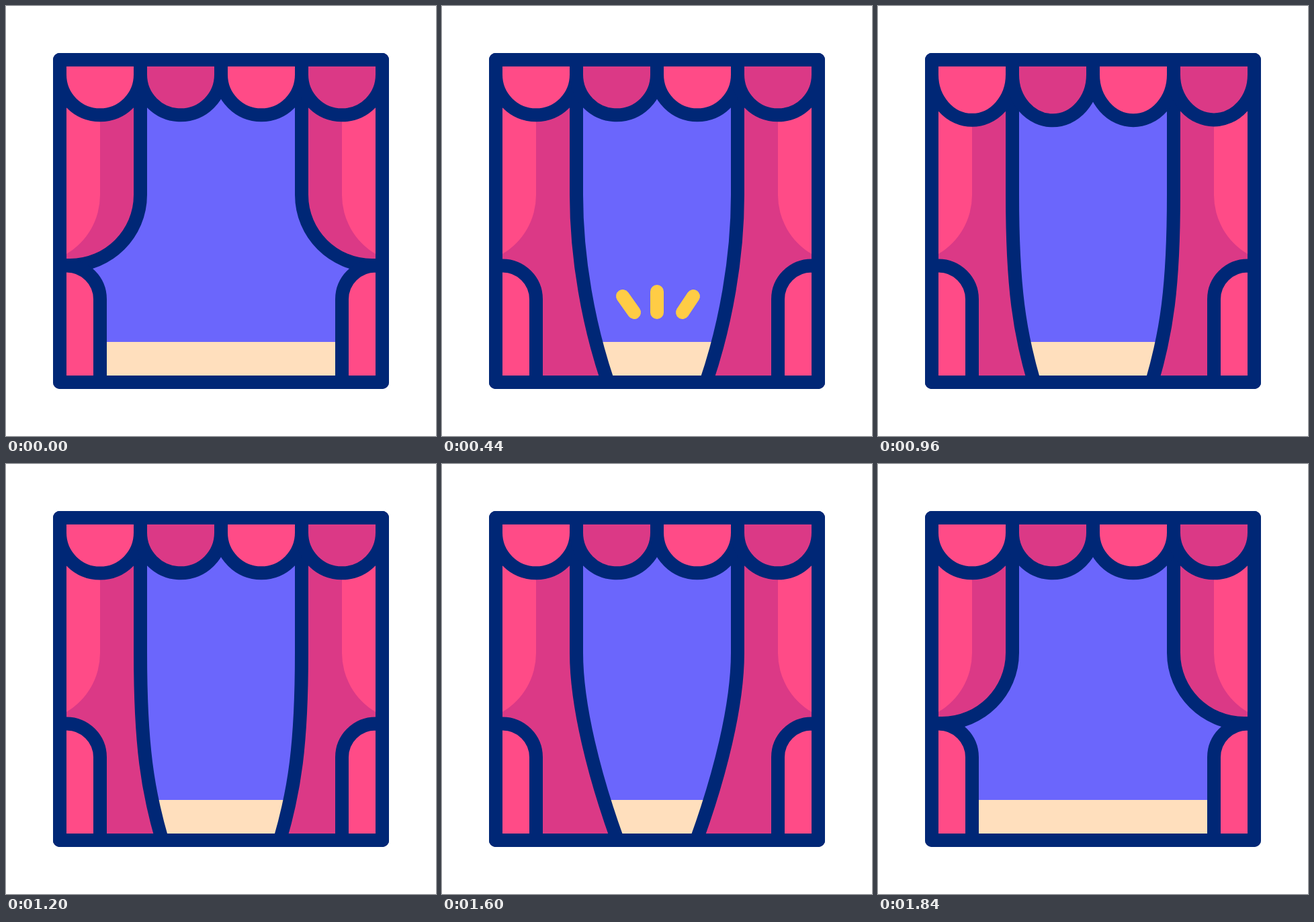
Write an HTML page that moves like this. It is 640 by 640 pixels and loops after 2 s.

```html
<!DOCTYPE html>
<html lang="en">
<head>
<meta charset="utf-8">
<title>Stage curtains</title>
<style>
  html, body { margin: 0; width: 100%; height: 100%; overflow: hidden; background: #fff; }
  svg { display: block; width: 100vw; height: 100vh; }
  .line { fill: none; stroke: #002776; stroke-width: 20; stroke-linejoin: round; }
  .pink { fill: #ff4b87; }
  .dark { fill: #db3986; }
  .ray { stroke: #ffcc45; stroke-width: 20; stroke-linecap: round; }
</style>
</head>
<body>
<svg viewBox="0 0 640 640">
  <defs>
    <g id="side">
      <path class="dark" data-curtain="1"/>
      <path class="pink" d="M80 80H140V281A102 102 0 0 1 90 369H80Z"/>
      <path class="line" data-curtain="1"/>
      <path class="line pink" style="fill:#ff4b87" d="M80 386.5H90A50 50 0 0 1 140 436.5V560H80Z"/>
    </g>
  </defs>
  <path fill="#6b66fc" d="M80 80H560V560H80Z"/>
  <path fill="#ffdfbd" d="M80 500H560V560H80Z"/>
  <g id="rays"></g>
  <use href="#side"/>
  <use href="#side" transform="matrix(-1 0 0 1 640 0)"/>
  <g id="valance"></g>
  <path class="line" d="M80 80H560V560H80Z"/>
</svg>
<script>
  const LOOP = 2000, STEP = 40;

  // Curtain edge: first handle y, second handle x y, hem x y
  const open = [339, 153, 386, 95, 386];
  const half = [365, 165, 475, 136, 560];
  const over = [360, 227, 465, 261.3, 560];
  const sway = [375, 218, 475, 247, 560];
  const shut = [420, 211, 487, 232.4, 560];
  const poses = [
    [0, open], [240, half], [360, over], [440, sway], [560, shut],
    [1440, shut], [1600, over], [1720, half], [1840, open], [LOOP, open]
  ];

  // Base and tip of each spark
  const sparks = [
    [286, 456, 269, 432],
    [320, 456, 320, 425],
    [358, 456, 374, 432]
  ];

  const mix = (a, b, u) => a + (b - a) * u;
  const ramp = (t, from, to) => Math.min(1, Math.max(0, (t - from) / (to - from)));

  function add(parent, tag, cls) {
    const el = document.createElementNS('http://www.w3.org/2000/svg', tag);
    el.setAttribute('class', cls);
    return document.getElementById(parent).appendChild(el);
  }

  const curtains = document.querySelectorAll('[data-curtain]');
  const rays = sparks.map(() => add('rays', 'line', 'ray'));
  const scallops = [0, 1, 2, 3].map(i => {
    const el = add('valance', 'path', 'line');
    el.style.fill = i % 2 ? '#db3986' : '#ff4b87';
    return el;
  });

  function poseAt(t) {
    const i = poses.findIndex(p => p[0] > t);
    const [t0, a] = poses[i - 1], [t1, b] = poses[i];
    return a.map((v, k) => mix(v, b[k], ramp(t, t0, t1)));
  }

  function draw(t) {
    const [y1, x2, y2, x, y] = poseAt(t);
    const edge = `M80 80H200V281C200 ${y1} ${x2} ${y2} ${x} ${y}H80Z`;
    curtains.forEach(c => c.setAttribute('d', edge));

    const head = ramp(t, 320, 440), tail = ramp(t, 440, 600);
    rays.forEach((ray, i) => {
      const [bx, by, tx, ty] = sparks[i];
      ray.setAttribute('x1', mix(bx, tx, tail));
      ray.setAttribute('y1', mix(by, ty, tail));
      ray.setAttribute('x2', mix(bx, tx, head));
      ray.setAttribute('y2', mix(by, ty, head));
      ray.style.display = head > 0 && tail < 1 ? '' : 'none';
    });

    // The valance ripples from right to left
    scallops.forEach((el, i) => {
      const start = 700 + (3 - i) * 35;
      const drop = 60 + 8 * Math.sin(Math.PI * ramp(t, start, start + 400));
      const left = 80 + 120 * i;
      el.setAttribute('d',
        `M${left} 80V102.3A60 ${drop} 0 0 0 ${left + 120} 102.3V80Z`);
    });
  }

  const begin = performance.now();
  function tick() {
    const t = (performance.now() - begin) % LOOP;
    draw(Math.floor(t / STEP) * STEP);
    requestAnimationFrame(tick);
  }
  tick();
</script>
</body>
</html>
```
